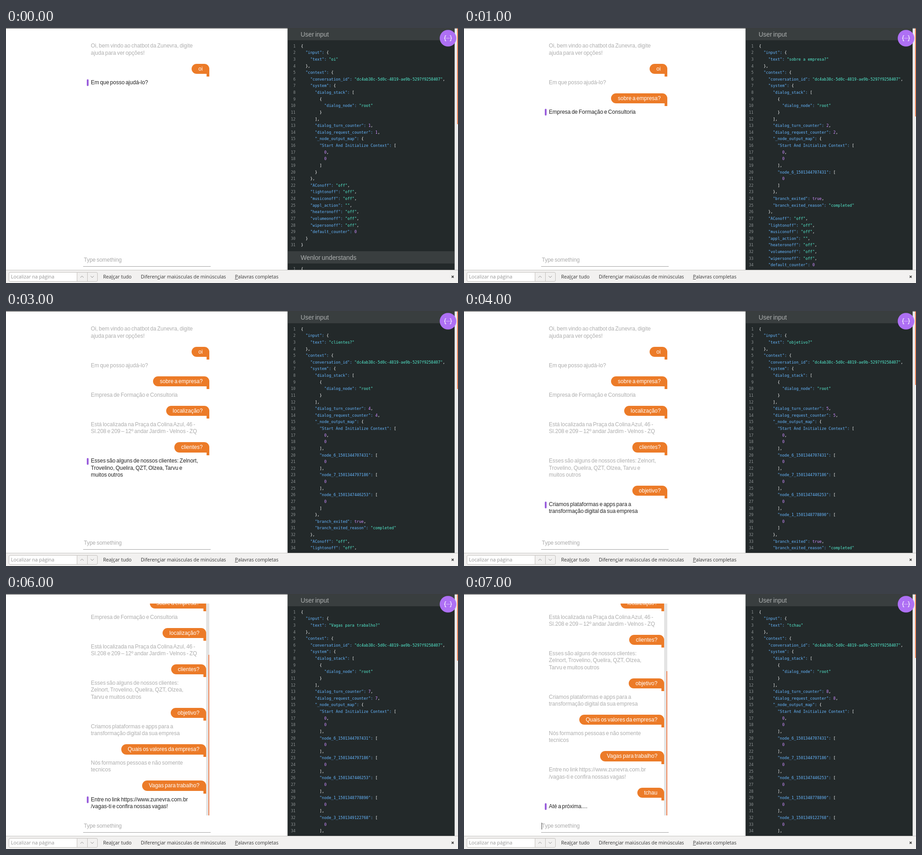
Animation, 996 px wide and 562 px high, one loop 8000 ms. Source, as an HTML page:

```html
<!DOCTYPE html>
<html lang="pt-BR">
<head>
<meta charset="utf-8">
<title>Chatbot</title>
<style>
  html, body { margin: 0; width: 100%; height: 100%; overflow: hidden; background: #fff; }
  #stage { position: relative; width: 996px; height: 562px; overflow: hidden;
    font: 12px/15.3px "Liberation Sans", Arial, sans-serif; word-spacing: -1.2px; }
  #stage div, #stage svg { position: absolute; box-sizing: border-box; white-space: pre; }
  #topline { left: 0; top: 0; width: 996px; height: 1px; background: #3c3c3c; }

  #chat { left: 150px; top: 20.5px; width: 298px; height: 467.5px; overflow: hidden; }
  .reply { left: 37px; color: #adadad; }
  .reply.last { color: #222; }
  .reply.last::before { content: ""; position: absolute; left: -9.5px; top: .5px;
    width: 4px; height: 15px; border-radius: 2px; background: #9a5fdc; }
  .bubble { right: 0; height: 22.6px; padding: 0 14.6px; line-height: 22.6px;
    border-radius: 11.3px 11.3px 0 11.3px; background: #ec7b28; color: #fff; }
  .bubble::after { content: ""; position: absolute; right: 0; top: 20px;
    width: 5.8px; height: 8.4px; background: #ec7b28; }
  .scrolled .bubble { right: 7.3px; }
  #track { right: 0; top: 0; width: 7.3px; height: 100%; background: #e4e4e4; }
  #thumb { right: 0; bottom: 0; width: 2.2px; background: #ef8354; }

  #entry { left: 170px; top: 503px; width: 281px; height: 22.5px; padding: 1px 0 0 1.5px;
    border-bottom: 1px solid #a0a0a0; color: #aaa; }
  #caret { left: 171px; top: 504px; width: 1px; height: 15px; background: #333; }

  #payload { left: 620px; top: 0; width: 369px; height: 533.5px; overflow: hidden; background: #23292a;
    border: solid #7a7e7f; border-width: 0 1px; }
  #payload section { position: relative; }
  #payload h2 { margin: 0; height: 27px; padding-left: 28.3px; background: #393e3f; color: #adb0b0;
    font: 13.9px/28px "Liberation Sans", Arial, sans-serif; }
  #payload pre { margin: 0; padding: 5.7px 0 5.7px 29px; color: #fff; word-spacing: 0;
    font: 8.5px/14.63px "DejaVu Sans Mono", monospace; }
  #payload pre.numbers { position: absolute; left: 0; top: 27px; width: 17px; padding-left: 0;
    text-align: right; color: #8b9091; }
  .key { color: #66b7ff; }
  .string { color: #54eed0; }
  .value { color: #ce8eff; }
  #pagetrack { left: 989px; top: 0; width: 7px; height: 533.5px; background: #ededed; }
  #pagethumb { right: 0; top: 0; width: 2.2px; background: #ef8354; }

  #find { left: 0; top: 533px; width: 996px; height: 29px; background: #f2f1f0; border-top: 1px solid #c4c2c0;
    color: #363636; font: 10.7px/16px "Open Sans", sans-serif; word-spacing: 0; }
  #find div { top: 6px; }
  #find .box { top: 4px; height: 21px; border: 1px solid #c2bfbc; }
</style>
</head>
<body>
<div id="stage">
  <div id="chat"></div>
  <div id="entry">Type something</div>
  <div id="caret"></div>
  <div id="payload"></div>
  <div id="pagetrack"><div id="pagethumb"></div></div>
  <div id="topline"></div>
  <svg style="left:955px;top:3px" width="38" height="39" fill="none" stroke="#fff" stroke-width="1.2">
    <circle cx="19" cy="19.5" r="18.3" fill="#ae70f4" stroke="none"/>
    <path d="M15 13.5q-2.5 0-2.5 2v2q0 2-2 2q2 0 2 2v2q0 2 2.5 2M23 13.5q2.5 0 2.5 2v2q0 2 2 2q-2 0-2 2v2q0 2-2.5 2"/>
    <path d="M15.6 19.5h1.4m1.3 0h1.4m1.3 0h1.4"/>
  </svg>
  <div id="find">
    <div class="box" style="left:6px;width:151px;background:#fff;border-radius:3px 0 0 3px"></div>
    <div class="box" style="left:156px;width:24px"></div>
    <div class="box" style="left:179px;width:23px;border-radius:0 3px 3px 0"></div>
    <div style="left:11px;color:#939393">Localizar na página</div>
    <svg style="left:0;top:0" width="996" height="28" fill="none" stroke="#8c8c8c">
      <path d="M164 16l3.5-3.5 3.5 3.5M186.5 12.5l3.5 3.5 3.5-3.5"/>
      <path d="M982 12l4.5 4.5m0-4.5l-4.5 4.5" stroke="#333" stroke-width="1.6"/>
    </svg>
    <div style="left:214px">Rea<u>l</u>çar tudo</div>
    <div style="left:297px">Diferen<u>c</u>iar maiúsculas de minúsculas</div>
    <div style="left:504.5px"><u>P</u>alavras completas</div>
  </div>
</div>
<script>
const $ = id => document.getElementById(id);
const LINE = 15.3, CHAT_TOP = 20.5, LAST_LINE = 468.5;

const welcome = "Oi, bem vindo ao chatbot da Zunevra, digite\najuda para ver opções!";
const clientsWide = "Esses são alguns de nossos clientes: Zelnort,\nTrovelino, Quelira, QZT, Olzea, Tarvu e\nmuitos outros";
const clientsNarrow = "Esses são alguns de nossos clientes:\nZelnort, Trovelino, Quelira, QZT, Olzea,\nTarvu e muitos outros";
const turns = [
  ["oi", "Em que posso ajudá-lo?"],
  ["sobre a empresa?", "Empresa de Formação e Consultoria"],
  ["localização?", "Está localizada na Praça da Colina Azul, 46 -\nSl.208 e 209 – 12º andar Jardim - Velnos - ZQ"],
  ["clientes?", clientsWide],
  ["objetivo?", "Criamos plataformas e apps para a\ntransformação digital da sua empresa"],
  ["Quais os valores da empresa?", "Nós formamos pessoas e não somente\ntecnicos"],
  ["Vagas para trabalho?", "Entre no link https://www.zunevra.com.br\n/vagas-ti e confira nossas vagas!"],
  ["tchau", "Até a próxima...."]
];
const nodes = ["node_6_1501344707431", "node_7_1501344797186", "node_6_1501347446253",
  "node_1_1501348778890", "node_3_1501349122768", "node_4_1501349300000", "node_5_1501349400000"];
const chatThumbTop = { 5: 74, 6: 134, 7: 170 };
const pageThumbHeight = [212, 195, 182, 172, 163, 155, 147, 141];

function drawChat(step) {
  const items = [];
  let y = 40;
  const addReply = (text, last) => {
    items.push({ kind: last ? "reply last" : "reply", text, top: y - LINE / 2 });
    y += (text.split("\n").length - 1) * LINE;
  };
  addReply(welcome);
  turns.slice(0, step + 1).forEach(([question, answer], i) => {
    y += 34.6;
    items.push({ kind: "bubble", text: question, top: y - 11.3 });
    y += 30.5;
    addReply(step > 4 && answer === clientsWide ? clientsNarrow : answer, i === step);
  });
  const scroll = Math.max(0, y - LAST_LINE);
  $("chat").className = scroll ? "scrolled" : "";
  $("chat").innerHTML = items.map(({ kind, text, top }) =>
    `<div class="${kind}" style="top:${top - scroll - CHAT_TOP}px">${text}</div>`).join("") +
    (scroll ? `<div id="track"></div><div id="thumb" style="height:${488 - chatThumbTop[step]}px"></div>` : "");
}

function requestBody(step) {
  const outputs = { "Start And Initialize Context": [0, 0] };
  nodes.slice(0, step).forEach(name => outputs[name] = [0]);
  const exit = step ? { branch_exited: true, branch_exited_reason: "completed" } : {};
  return {
    input: { text: turns[step][0] },
    context: {
      conversation_id: "dc4ab38c-5d0c-4819-ae9b-5297f9258407",
      system: {
        dialog_stack: [{ dialog_node: "root" }],
        dialog_turn_counter: step + 1,
        dialog_request_counter: step + 1,
        _node_output_map: outputs,
        ...exit
      },
      AConoff: "off", lightonoff: "off", musiconoff: "off", appl_action: "",
      heateronoff: "off", volumeonoff: "off", wipersonoff: "off", default_counter: 0
    }
  };
}

function panel(title, data) {
  const json = JSON.stringify(data, null, 2);
  const numbers = json.split("\n").map((_, i) => i + 1).join("\n");
  const code = json.replace(/("[^"]*"(:)?)|\b(true|\d+)\b/g, (token, quoted, colon) =>
    `<span class="${colon ? "key" : quoted ? "string" : "value"}">${token}</span>`);
  return `<section><h2>${title}</h2><pre class="numbers">${numbers}</pre><pre>${code}</pre></section>`;
}

function draw(step) {
  drawChat(step);
  $("payload").innerHTML = panel("User input", requestBody(step)) + panel("Wenlor understands", { intents: [] });
  $("pagethumb").style.height = pageThumbHeight[step] + "px";
  $("caret").hidden = step !== 2 && step !== 7;
}

let shown = -1;
function tick() {
  const step = Math.floor(performance.now() / 1000) % turns.length;
  if (step !== shown) draw(shown = step);
  requestAnimationFrame(tick);
}
tick();
</script>
</body>
</html>
```
